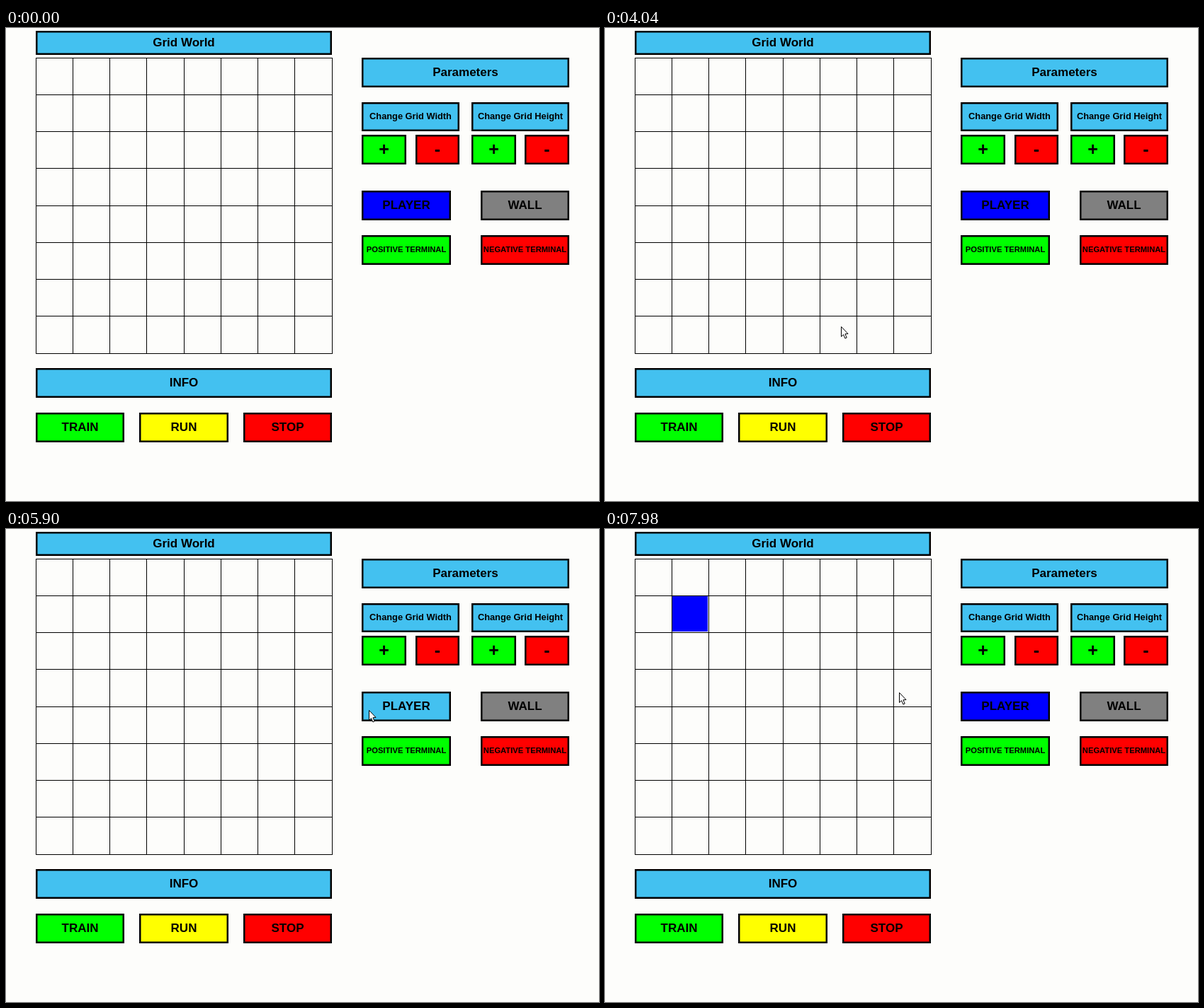
Recreate the animation shown at these times as an HTML page with a canvas. Size 837 by 669 pixels, loop 8 s.

```html
<!DOCTYPE html>
<html lang="en">
<head>
<meta charset="utf-8">
<title>Grid World</title>
<style>
html, body { margin: 0; width: 100%; height: 100%; overflow: hidden; background: #fdfdfb; }
canvas { display: block; }
</style>
</head>
<body>
<canvas id="stage" width="837" height="669"></canvas>
<script>
const ctx = document.getElementById('stage').getContext('2d');
const LOOP = 8000, PLACED_AT = 7180;
const SKY = '#43c1f0', GREEN = '#00ff00', RED = '#ff0000', BLUE = '#0000ff';
const GRAY = '#808080', YELLOW = '#ffff00';

// The layout uses an 800-unit wide stage with a 40-unit module.
const UNIT = 837 / 800, MODULE = 40;
const LEFT = MODULE, RIGHT = 12 * MODULE, PANEL = 7 * MODULE;
const px = v => Math.round(v * UNIT);
const HALF = PANEL / 2 - 8, SIGN = 1.5 * MODULE, BUTTON = 3 * MODULE;

// Pointer stops: time, x, y
const path = [
  [2360, 326, 612], [3260, 333, 422], [4200, 333, 422],
  [5180, 512, 256], [5960, 512, 256],
  [6700, 124, 123], [7540, 120, 121], [8000, 416, 232]
];

function pointerAt(t) {
  const i = path.findIndex(p => t < p[0]);
  if (i < 1) return null;
  const [t0, x0, y0] = path[i - 1], [t1, x1, y1] = path[i];
  const u = (t - t0) / (t1 - t0), k = u * u * (3 - 2 * u);
  return { x: Math.round(x0 + (x1 - x0) * k), y: Math.round(y0 + (y1 - y0) * k) };
}

function drawBox(label, fill, x, y, w, size = 17, h = MODULE) {
  const l = px(x), t = px(y), r = px(x + w), b = px(y + h);
  ctx.fillStyle = '#000';
  ctx.fillRect(l, t, r - l, b - t);
  ctx.fillStyle = fill;
  ctx.fillRect(l + 2.5, t + 2.5, r - l - 5, b - t - 5);
  ctx.fillStyle = '#000';
  ctx.font = `bold ${size}px "Liberation Sans", Arial, sans-serif`;
  ctx.fillText(label, (l + r) / 2, Math.floor((y + h / 2) * UNIT + size * 0.34));
}

// Spreads equal boxes from edge to edge of a panel.
function drawRow(labels, fills, x, y, span, w, size) {
  const step = (span - w) / (labels.length - 1);
  labels.forEach((label, i) => drawBox(label, fills[i], x + i * step, y, w, size));
}

function drawGrid(placed) {
  const cell = 52.25, at = i => Math.floor(42 + i * cell);
  if (placed) {
    ctx.fillStyle = BLUE;
    ctx.fillRect(at(1), at(1), 51, 51);
  }
  ctx.fillStyle = '#000';
  for (let i = 0; i <= 8; i++) {
    ctx.fillRect(at(i), at(0), 1, 8 * cell + 1);
    ctx.fillRect(at(0), at(i), 8 * cell + 1, 1);
  }
}

function drawPanels(hover) {
  const wide = 10 * MODULE;
  drawBox('Grid World', SKY, LEFT, 4, wide, 17, 32);
  drawBox('INFO', SKY, LEFT, 460, wide);
  drawRow(['TRAIN', 'RUN', 'STOP'], [GREEN, YELLOW, RED], LEFT, 520, wide, BUTTON);

  drawBox('Parameters', SKY, RIGHT, 40, PANEL);
  drawRow(['Change Grid Width', 'Change Grid Height'], [SKY, SKY], RIGHT, 100, PANEL, HALF, 12.8);
  for (const x of [RIGHT, RIGHT + PANEL - HALF]) {
    drawRow(['+', '-'], [GREEN, RED], x, 144, HALF, SIGN, 25);
  }
  drawRow(['PLAYER', 'WALL'], [hover ? SKY : BLUE, GRAY], RIGHT, 220, PANEL, BUTTON);
  drawRow(['POSITIVE TERMINAL', 'NEGATIVE TERMINAL'], [GREEN, RED], RIGHT, 280, PANEL, BUTTON, 11.2);
}

function overPlayer({ x, y }) {
  const u = x / UNIT - RIGHT, v = y / UNIT - 220;
  return u >= 0 && u < BUTTON && v >= 0 && v < MODULE;
}

function drawPointer({ x, y }) {
  const arrow = new Path2D('M0 0V14L3 11.2L5.4 16.5L7.7 15.5L5.4 10.3L9.5 10Z');
  ctx.save();
  ctx.translate(x + 0.5, y + 0.5);
  ctx.fillStyle = '#fff';
  ctx.fill(arrow);
  ctx.strokeStyle = '#000';
  ctx.stroke(arrow);
  ctx.restore();
}

function frame(now) {
  const t = now % LOOP, pointer = pointerAt(t);
  ctx.fillStyle = '#fdfdfb';
  ctx.fillRect(0, 0, 837, 669);
  ctx.textAlign = 'center';
  drawGrid(t >= PLACED_AT);
  drawPanels(pointer && overPlayer(pointer));
  if (pointer) drawPointer(pointer);
  requestAnimationFrame(frame);
}
requestAnimationFrame(frame);
</script>
</body>
</html>
```
